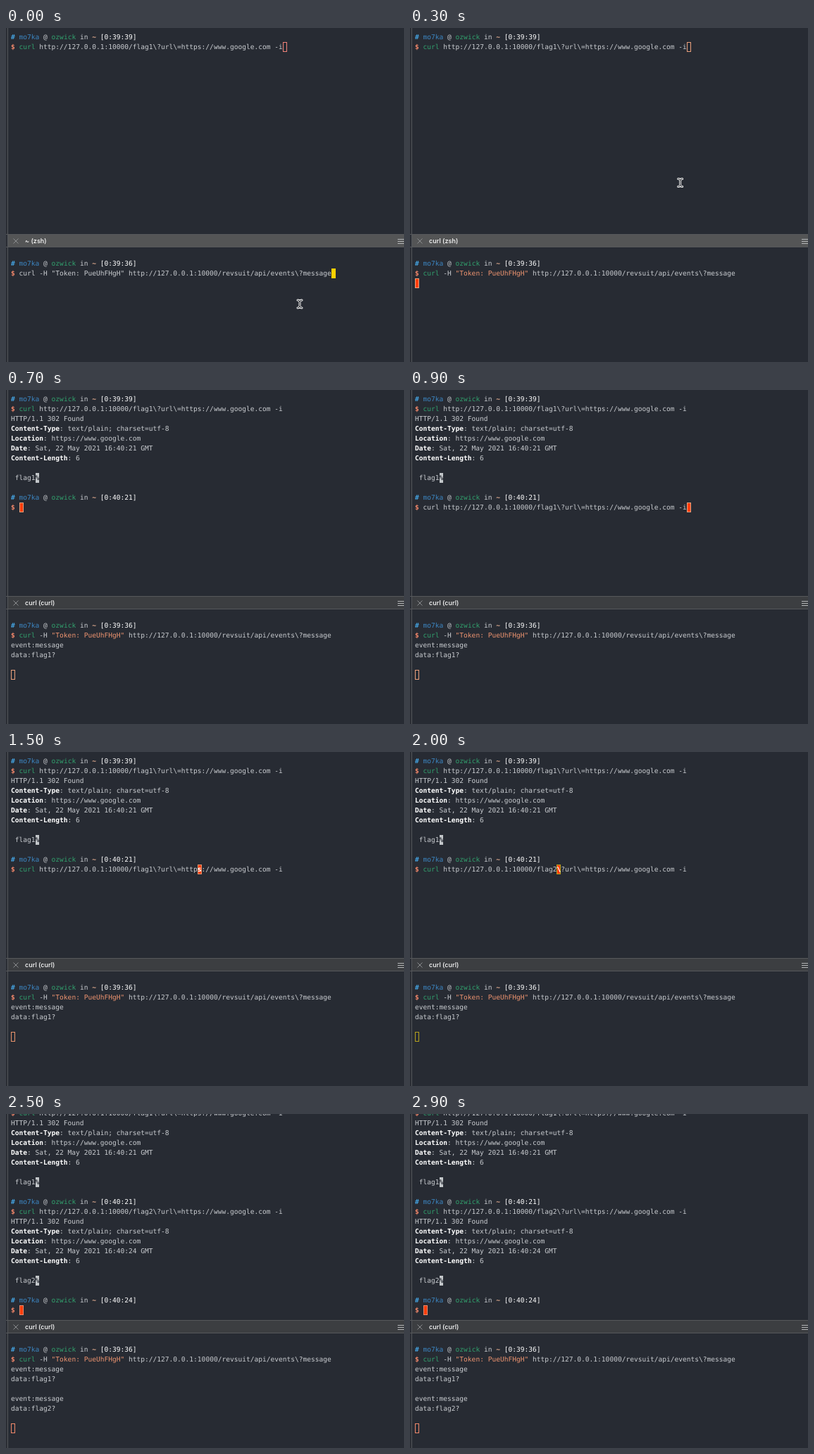
Write an HTML page that moves like this. It is 565 px wide and 475 px high and loops after 3000 ms.

```html
<!DOCTYPE html>
<html lang="en">
<head>
<meta charset="utf-8">
<title>Terminal</title>
<style>
  html, body { margin: 0; width: 100%; height: 100%; overflow: hidden; background: #272b33; }
  #stage { position: relative; width: 565px; height: 475px; overflow: hidden; background: #272b33; }
  #edge { position: absolute; left: 0; top: 0; width: 2px; height: 475px; background: #2b2e35; border-right: 1px solid #54575b; }
  .pane { position: absolute; left: 3px; width: 562px; overflow: hidden; }
  #upper { top: 0; height: 293px; }
  #lower { top: 312px; height: 163px; }
  .rows {
    position: absolute; left: 4px; white-space: pre; color: #c9ccd0;
    font: 9.57px/14px "DejaVu Sans Mono", Menlo, monospace;
    text-rendering: geometricPrecision; font-variant-ligatures: none;
  }
  #upper .rows { top: 7px; }
  #lower .rows { top: 17px; }
  .row { position: relative; height: 14px; }
  .hash { color: #45a3e0; font-weight: bold; }
  .user { color: #3c86c2; }
  .host, .cmd { color: #32a06d; }
  .path { color: #e3ac90; font-weight: bold; }
  .time, .key { color: #fff; }
  .key { font-weight: bold; }
  .dollar { color: #f2876a; font-weight: bold; }
  .str { color: #ee9470; }
  .eol, .cur { height: 14px; line-height: 16px; font-weight: bold; }
  .eol { position: relative; top: -1px; display: inline-block; vertical-align: top; background: #c3c7ca; color: #272b33; }
  .cur { position: absolute; top: -1px; width: 6px; color: #fff; }
  .cur::before { content: ""; position: absolute; z-index: -1; inset: 0; box-sizing: border-box; border: 1px solid var(--line); background: var(--fill); }
  .rows { z-index: 0; }
  #bar {
    position: absolute; left: 3px; top: 293px; width: 562px; height: 19px; box-sizing: border-box;
    border: solid #56585b; border-width: 1px 0; background: #3c3e41;
  }
  #bar::before { content: ""; position: absolute; left: -3px; top: -1px; width: 3px; height: 17px; border: inherit; }
  #bar.on { background: #545556; }
  #title { position: absolute; left: 24px; top: 0; font: 500 9.1px/18px Inter, sans-serif; color: #fff; white-space: pre; }
  #bar svg, #mouse { position: absolute; left: 0; top: 0; overflow: visible; }
</style>
</head>
<body>
<div id="stage">
  <div id="edge"></div>
  <div class="pane" id="upper"><div class="rows"></div></div>
  <div id="bar">
    <svg width="562" height="17" fill="none">
      <path d="M7.5 5.5l7 7m0-7l-7 7" stroke="#8b8d8f"/>
      <path d="M553 6.5h9m-9 3h9m-9 3h9" stroke="#b4b6b8"/>
    </svg>
    <div id="title"></div>
  </div>
  <div class="pane" id="lower"><div class="rows"></div></div>
  <svg id="mouse" width="12" height="16" fill="none">
    <g id="beam" stroke-linecap="round">
      <path d="M-3-5.5q3 0 3 2.5q0-2.5 3-2.5M-3 5.5q3 0 3-2.5q0 2.5 3 2.5M0-3v6" stroke="#f4f4f4" stroke-width="3"/>
      <path d="M-3-5.5q3 0 3 2.5q0-2.5 3-2.5M-3 5.5q3 0 3-2.5q0 2.5 3 2.5M0-3v6" stroke="#22252b"/>
    </g>
  </svg>
</div>
<script>
const $ = s => document.querySelector(s);
const span = (cls, text) => `<span class="${cls}">${text}</span>`;
const STEP = 100, LOOP = 3000, RED = '#ff3d0c', YELLOW = '#ffd000';

const prompt = time => [span('hash', '#'), span('user', 'mo7ka'), '@', span('host', 'ozwick'),
  'in', span('path', '~'), span('time', `[${time}]`)].join(' ');
const dollar = span('dollar', '$') + ' ';
// A freshly recalled command is plain until the shell highlights it.
const curl = plain => dollar + (plain ? 'curl' : span('cmd', 'curl'));
const args = flag => ` http://127.0.0.1:10000/${flag}\\?url\\=https://www.google.com -i`;
const request = (flag, plain) => curl(plain) + args(flag);
const field = (name, value) => `${span('key', name)}: ${value}`;

const response = (flag, second) => [
  'HTTP/1.1 302 Found',
  field('Content-Type', 'text/plain; charset=utf-8'),
  field('Location', 'https://www.google.com'),
  field('Date', `Sat, 22 May 2021 16:40:${second} GMT`),
  field('Content-Length', 6),
  '', ` ${flag}${span('eol', '%')}`, '',
  prompt(`0:40:${second}`)
];
const event = flag => ['event:message', `data:${flag}?`, ''];

const cursor = (col, line, fill = 'none', char = '') =>
  `<span class="cur" style="left:${col}ch;--line:${line};--fill:${fill}">${char}</span>`;

function outline(n) {
  const stops = [[21, '#f0886a'], [19, '#b5a11f'], [13, '#e8936c'], [3, '#eaa07c'], [0, '#f2837a']];
  return stops.find(([from]) => n >= from)[1];
}

// Key repeat walks the cursor back to the flag number.
function editCol(n) {
  if (n <= 10) return 67;
  if (n === 11) return 66;
  if (n <= 17) return Math.round(63 - (n - 12) * 5.6);
  return n === 18 ? 34 : 35;
}

function upperRows(n) {
  const line = outline(n);
  const rows = [prompt('0:39:39'), request('flag1')];
  if (n < 7) {
    rows[1] += cursor(67, line, n < 5 ? 'none' : RED);
    return rows;
  }
  rows.push(...response('flag1', 21));
  if (n < 9) {
    rows.push(dollar + cursor(2, line, RED));
  } else if (n < 21) {
    const flag = n < 18 ? 'flag1' : n === 18 ? 'flag' : 'flag2';
    const col = editCol(n);
    rows.push(request(flag, n === 9) + cursor(col, line, RED, ('$ curl' + args(flag))[col]));
  } else {
    rows.push(request('flag2'), ...response('flag2', 24), dollar + cursor(2, line, RED));
  }
  return rows;
}

function lowerRows(n) {
  const token = '"Token: PueUhFHgH"';
  const plain = n === 0;
  const rows = [prompt('0:39:36'), curl(plain) + ' -H ' + (plain ? token : span('str', token)) +
    ' http://127.0.0.1:10000/revsuit/api/events\\?message'];
  if (n < 2) {
    rows[1] += cursor(79, YELLOW, YELLOW);
    return rows;
  }
  if (n >= 7) rows.push(...event('flag1'));
  if (n >= 21) rows.push(...event('flag2'));
  rows.push(cursor(0, outline(n), n < 5 ? RED : 'none'));
  return rows;
}

function fill(pane, rows, scroll = 0) {
  const box = $(pane + ' .rows');
  box.innerHTML = rows.map(r => `<div class="row">${r}</div>`).join('');
  box.style.transform = `translateY(${-14 * scroll}px)`;
}

function draw(n) {
  fill('#upper', upperRows(n), n >= 21 ? 2 : 0);
  fill('#lower', lowerRows(n));
  $('#bar').className = n < 4 ? 'on' : '';
  $('#title').textContent = n < 2 ? '~ (zsh)' : n < 5 ? 'curl (zsh)' : 'curl (curl)';
  const p = Math.min(1, Math.max(0, (n - 1) / 3));
  const k = p * p * (3 - 2 * p);
  $('#beam').setAttribute('transform', `translate(${417 - 45 * k} ${392.5 - 233 * k})`);
  $('#mouse').style.display = n < 7 ? '' : 'none';
}

let shown = -1;
const start = performance.now();
function tick() {
  const n = Math.floor((performance.now() - start) % LOOP / STEP);
  if (n !== shown) draw(shown = n);
  requestAnimationFrame(tick);
}
tick();
</script>
</body>
</html>
```
